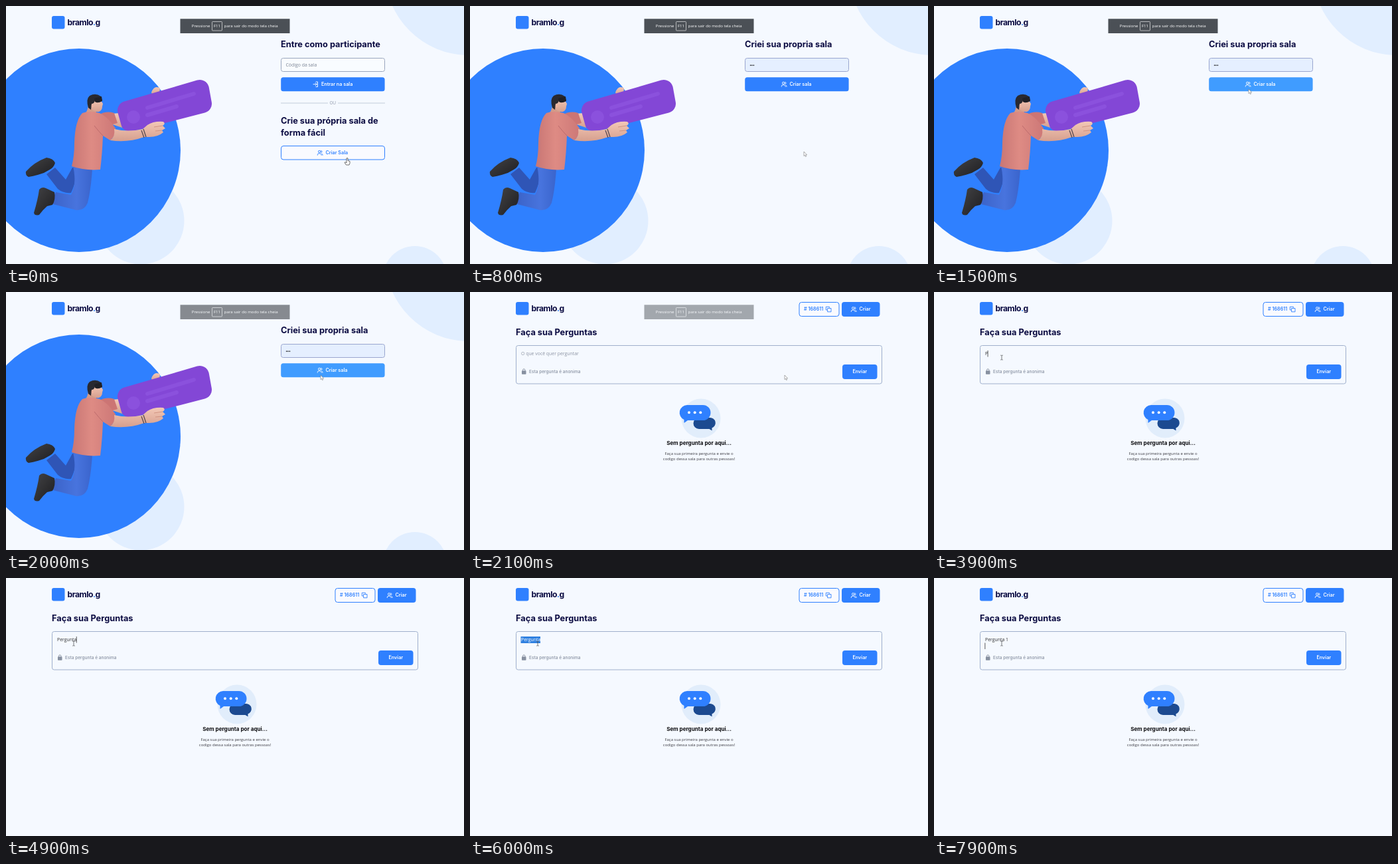
Write an HTML page that moves like this. It is 690 by 388 pixels and loops after 8000 ms.

```html
<!DOCTYPE html>
<html lang="pt-BR">
<head>
<meta charset="utf-8">
<title>Sala de perguntas</title>
<style>
  html, body { margin: 0; width: 100%; height: 100%; overflow: hidden; background: #f5f9ff; }
  svg { display: block; width: 100%; height: 100%; }
  text { font-family: Inter, Roboto, sans-serif; white-space: pre; }
  .body { font-family: "Open Sans", "Noto Sans", sans-serif; }
  .title { font-weight: 700; font-size: 12.8px; fill: #0c0c42; }
  .label { font-weight: 600; font-size: 7.2px; fill: #fff; }
  .field { font-size: 6.9px; fill: #7b8494; }
  .mid { text-anchor: middle; }
  .blue { fill: #2f80ff; }
  .pale { fill: #e1eeff; }
  .outline { fill: #f9faff; stroke: #2f80ff; }
  .blueText { fill: #2f80ff; }
  .icon { fill: none; stroke: #fff; stroke-width: .9; stroke-linecap: round; stroke-linejoin: round; }
  .icon.blueLine { stroke: #2f80ff; }
</style>
</head>
<body>
<svg viewBox="0 0 690 388" preserveAspectRatio="none">
  <defs>
    <linearGradient id="shirt"><stop stop-color="#c87674"/><stop offset=".45" stop-color="#de8b84"/><stop offset="1" stop-color="#cd7877"/></linearGradient>
    <linearGradient id="skin" x2="0" y2="1"><stop stop-color="#f3c8b6"/><stop offset="1" stop-color="#d69f8e"/></linearGradient>
    <linearGradient id="jeans"><stop stop-color="#3b63c8"/><stop offset=".6" stop-color="#4874de"/><stop offset="1" stop-color="#3a64cc"/></linearGradient>
    <linearGradient id="shoe" x2="1" y2="1"><stop stop-color="#434345"/><stop offset="1" stop-color="#1d1d20"/></linearGradient>
    <g id="people">
      <circle cx="3.2" cy="2.3" r="1.7"/>
      <path d="M.3 7.6V6.9Q.4 5.2 2.2 5.2H4.2Q6 5.2 6.1 6.9V7.6M5.8.7Q7 1 7 2.3T5.8 3.9M7 5.4Q8.1 5.8 8.1 7.6"/>
    </g>
  </defs>

  <g id="landing">
    <g class="pale">
      <circle cx="697" cy="-52" r="126"/>
      <circle cx="616" cy="409.5" r="48.5"/>
      <circle cx="203" cy="323" r="65.5"/>
    </g>
    <circle class="blue" cx="110" cy="217" r="153"/>

    <g id="person">
      <!-- back leg, then front leg -->
      <path d="M106 243Q107 262 98 281Q86 282 78 275L61 253L74 243L90 261L100 243Z" fill="#2f55b6"/>
      <path d="M30 249Q42 235 61 228Q71 229 74 236Q72 243 66 246L57 251Q46 255 34 257Q29 255 30 249Z" fill="url(#shoe)"/>
      <path d="M101 241L130 245Q128 276 123 296Q118 308 106 307L71 298Q69 289 75 280L98 284Q107 268 101 241Z" fill="url(#jeans)"/>
      <path d="M42 311Q48 291 50 276Q54 271 60 274L73 280Q75 291 70 299L62 301Q55 307 50 314Q43 316 42 311Z" fill="url(#shoe)"/>
      <!-- far arm behind the card -->
      <path d="M159 162L171 161L175 183L160 178Z" fill="url(#skin)"/>
      <path d="M139 164Q151 157 163 161L168 176L150 181Z" fill="#cc7574"/>
      <path d="M219 130Q222 122 227 122L232 123L231 133L221 134Z" fill="url(#skin)"/>
      <path d="M182 157L292 125L296 147L187 175Z" fill="#8347d6" stroke="#8347d6" stroke-width="28" stroke-linejoin="round"/>
      <g fill="none" stroke="#8b51dd" stroke-width="6" stroke-linecap="round">
        <circle cx="192" cy="167" r="10" fill="#8b51dd" stroke="none"/>
        <path d="M213 153L283 132M213 164L257 151"/>
      </g>
      <!-- neck and head -->
      <path d="M124 148L137 152Q134 160 138 166L117 165Q124 157 124 148Z" fill="#d39a88"/>
      <path d="M128 141L141 139L146 147L145 151Q145 157 140 159Q132 160 127 153Z" fill="url(#skin)"/>
      <path d="M124 153Q120 140 126 135Q135 130 143 136L145 142L138 144L134 142Q133 147 129 147L128 156Z" fill="#292930"/>
      <path d="M133 139L144 136L145 143Q138 147 134 144Z" fill="#202026"/>
      <ellipse cx="130.5" cy="150" rx="1.8" ry="2.6" fill="#efb39f"/>
      <!-- shirt and near arm -->
      <path d="M115 161Q126 157 141 161Q153 166 165 184Q166 195 157 202L146 195Q145 222 142 246Q119 248 99 241Q103 226 103 206Q104 172 115 161Z" fill="url(#shirt)"/>
      <path d="M133 180Q141 190 146 195" fill="none" stroke="#bd6b6d"/>
      <path d="M163 185Q184 190 206 185L213 179Q222 173 237 174Q241 177 236 180L240 184L235 187L237 190Q229 197 216 197L208 197Q183 206 157 202Q165 196 163 185Z" fill="url(#skin)"/>
      <path d="M204 187L208 198M207 185L211 197" stroke="#5a4d55" stroke-width="1.3"/>
      <path d="M223 182L236 180M225 188L235 187" stroke="#ca8877" stroke-width=".8"/>
    </g>

    <g id="join">
      <text class="title" x="414" y="62">Entre como participante</text>
      <rect x="414.5" y="78.5" width="156" height="20" rx="3" fill="#fff" fill-opacity=".4" stroke="#9aa6bd"/>
      <text class="body field" x="421.5" y="91">Código da sala</text>
      <rect class="blue" x="414.2" y="107.3" width="156.4" height="21" rx="3.5"/>
      <path class="icon" d="M463 117.7H468M466.2 115.6L468.3 117.7L466.2 119.8M467 114H469.5V121.5H467"/>
      <text class="label" x="475" y="120.3">Entrar na sala</text>
      <path d="M414 146H485M500 146H571" stroke="#b5bfd0" stroke-width=".8"/>
      <text class="mid" x="492.3" y="148.3" font-size="6.5" fill="#99a2b2">OU</text>
      <text class="title" x="414" y="176.5">Crie sua própria sala de</text>
      <text class="title" x="414" y="194.5">forma fácil</text>
      <rect class="outline" x="414.5" y="210.5" width="156" height="20.5" rx="3.5"/>
      <use class="icon blueLine" href="#people" x="469" y="216.7"/>
      <text class="label blueText" x="481.5" y="223.3">Criar Sala</text>
    </g>

    <g id="create">
      <text class="title" x="414" y="62">Criei sua propria sala</text>
      <rect x="414.5" y="78.5" width="156" height="20" rx="3" fill="#e5efff" stroke="#9aa6cf"/>
      <text class="body" x="421.5" y="90.2" font-size="8" font-weight="800" fill="#111">...</text>
      <rect id="createButton" x="414.2" y="107.3" width="156.4" height="21" rx="3.5"/>
      <use class="icon" href="#people" x="469" y="113.6"/>
      <text class="label" x="481.5" y="120.3">Criar sala</text>
    </g>
  </g>

  <g id="room">
    <rect class="outline" x="496" y="15.5" width="60" height="21" rx="3.5"/>
    <text class="label blueText" x="503" y="28.3">#&nbsp;168611</text>
    <path class="icon blueLine" d="M539 24.5H544V29.8H539ZM537.8 27H536.3V22.2H541.4V23.3"/>
    <rect class="blue" x="560" y="15" width="57.5" height="22" rx="4"/>
    <use class="icon" href="#people" x="574" y="22"/>
    <text class="label" x="586.5" y="28.3">Criar</text>

    <text class="title" x="69" y="65">Faça sua Perguntas</text>
    <rect x="69.5" y="80.5" width="551" height="57.5" rx="3" fill="none" stroke="#9fb0cc"/>
    <text id="hint" class="body field" x="77" y="95.3" fill-opacity=".85">O que você quer perguntar</text>
    <rect id="selection" x="76.5" y="88" width="29.5" height="10" fill="#2f80e0"/>
    <text id="typed" class="body" x="77" y="95.3" font-size="6.9"></text>
    <rect id="caret" width=".8" height="9.5" fill="#333"/>
    <g fill="#8790a0">
      <rect x="78" y="118.3" width="6.5" height="5.4" rx=".8"/>
      <path d="M79.5 118.5V117.5Q79.5 115.8 81.2 115.8T83 117.5V118.5" fill="none" stroke="#8790a0"/>
      <text x="89" y="122.2" font-size="6.55" font-weight="500">Esta pergunta é anonima</text>
    </g>
    <rect class="blue" x="561" y="109" width="52.5" height="22" rx="4"/>
    <text class="label mid" x="587.3" y="122.4">Enviar</text>

    <circle cx="348" cy="190" r="29.5" fill="#e1edfb"/>
    <path d="M345 189H361A8 8 0 0 1 364.5 204.5V208.5L360.5 206H345A8.5 8.5 0 0 1 345 189Z" fill="#1c4a90"/>
    <path class="blue" d="M327 170H351A11.5 11.5 0 0 1 351 193H328L322.5 197V192A11.5 11.5 0 0 1 327 170Z"/>
    <g fill="#fff"><circle cx="330" cy="181.3" r="2"/><circle cx="338.7" cy="181.3" r="2"/><circle cx="347.3" cy="181.3" r="2"/></g>
    <text class="mid" x="345" y="229.7" font-size="8.1" font-weight="700" fill="#0d0d10">Sem pergunta por aqui...</text>
    <g class="mid" font-size="6" fill="#3a3a40">
      <text class="body" x="345" y="245">Faça sua primeira pergunta e envie o</text>
      <text class="body" x="345" y="253.2">codigo dessa sala para outras pessoas!</text>
    </g>
  </g>

  <rect class="blue" x="69" y="15" width="19.5" height="19.5" rx="3"/>
  <text x="92.5" y="28.5" font-size="12.2" font-weight="700" letter-spacing="-.5" fill="#0c0c42">bramlo<tspan class="blue">.</tspan>g</text>

  <g id="banner" fill="#fff" font-size="6.1">
    <rect x="262.5" y="19.3" width="165" height="21.7" fill="#4b5056"/>
    <text class="body" x="279.8" y="32.3">Pressione</text>
    <rect x="310.5" y="23.5" width="15" height="13.5" rx="1" fill="none" stroke="#fff" stroke-width=".6"/>
    <text class="body mid" x="318" y="32.3">F11</text>
    <text class="body" x="328.8" y="32.3">para sair do modo tela cheia</text>
  </g>

  <g id="pointer" stroke-linejoin="round">
    <path id="hand" d="M-1 0Q0-1 1 0V3.5L4 4.5V7.5L3 10H-1.5L-4 6.5L-3 5.7L-1 7Z" fill="#fff" stroke="#333" stroke-width=".7"/>
    <path id="arrow" d="M0 0V6.6L1.5 5.3L2.5 7.6L3.6 7.1L2.6 4.8H4.6Z" fill="#fff" stroke="#777" stroke-width=".6"/>
    <path id="beam" d="M-1.8-3.3H-.5L0-2.8L.5-3.3H1.8M0-2.8V3M-1.8 3.5H-.5L0 3L.5 3.5H1.8" fill="none" stroke="#444" stroke-width=".7"/>
  </g>
</svg>
<script>
  const LOOP = 8000, CREATE = 100, HOVER = 1400, ROOM = 2100, BEAM = 2600;
  const el = id => document.getElementById(id);
  const show = (id, visible) => { el(id).style.display = visible ? '' : 'none'; };

  // time, x, y
  const route = [
    [0, 514, 229], [100, 514, 229], [700, 503, 219], [1000, 503, 219],
    [1500, 474, 125], [2100, 474, 125], [2600, 157, 113], [3000, 102, 98.5], [LOOP, 102, 98.5]
  ];

  // time, text, mode
  const word = 'Pergunta';
  const edits = [
    [0, '', 'idle'], [3000, '', 'caret'], [3500, '', 'idle'],
    ...[3900, 4100, 4300, 4500, 4600, 4700, 4800, 4900].map((t, i) => [t, word.slice(0, i + 1), 'caret']),
    [5100, word + ' ', 'caret'], [5600, word + ' ', 'idle'], [5800, word, 'caret'],
    [6000, word, 'selected'], [7000, word, 'caret'], [7300, word + ' ', 'caret'],
    [7500, word + ' 1', 'caret'], [7900, word + ' 1', 'newline']
  ];

  function pointerAt(t) {
    const i = route.findIndex(p => p[0] > t);
    const [t0, x0, y0] = route[i - 1], [t1, x1, y1] = route[i];
    const k = (t - t0) / (t1 - t0), e = k * k * (3 - 2 * k);
    return [x0 + (x1 - x0) * e, y0 + (y1 - y0) * e];
  }

  function drawEditor(t) {
    const [, text, mode] = edits.findLast(e => e[0] <= t);
    const typed = el('typed'), caret = el('caret'), newline = mode === 'newline';
    typed.textContent = text;
    typed.setAttribute('fill', mode === 'selected' ? '#fff' : '#333');
    show('hint', !text);
    show('selection', mode === 'selected');
    show('caret', mode === 'caret' || newline);
    caret.setAttribute('x', 76.5 + (newline || !text ? 0 : typed.getComputedTextLength()));
    caret.setAttribute('y', newline ? 97.5 : 88);
  }

  function draw(now) {
    const t = Math.floor(now % LOOP / 100) * 100;
    show('landing', t < ROOM);
    show('join', t < CREATE);
    show('create', t >= CREATE);
    show('room', t >= ROOM);
    el('createButton').setAttribute('fill', t < HOVER ? '#2f80ff' : '#409cff');
    el('banner').setAttribute('opacity', Math.max(0, Math.min(1, (2390 - t) / 600)));
    if (t >= ROOM) drawEditor(t);

    show('hand', t < CREATE);
    show('arrow', t >= CREATE && t < BEAM);
    show('beam', t >= BEAM);
    el('pointer').setAttribute('transform', `translate(${pointerAt(t)})`);
  }

  const start = performance.now();
  function tick() {
    draw(performance.now() - start);
    requestAnimationFrame(tick);
  }
  tick();
</script>
</body>
</html>
```
